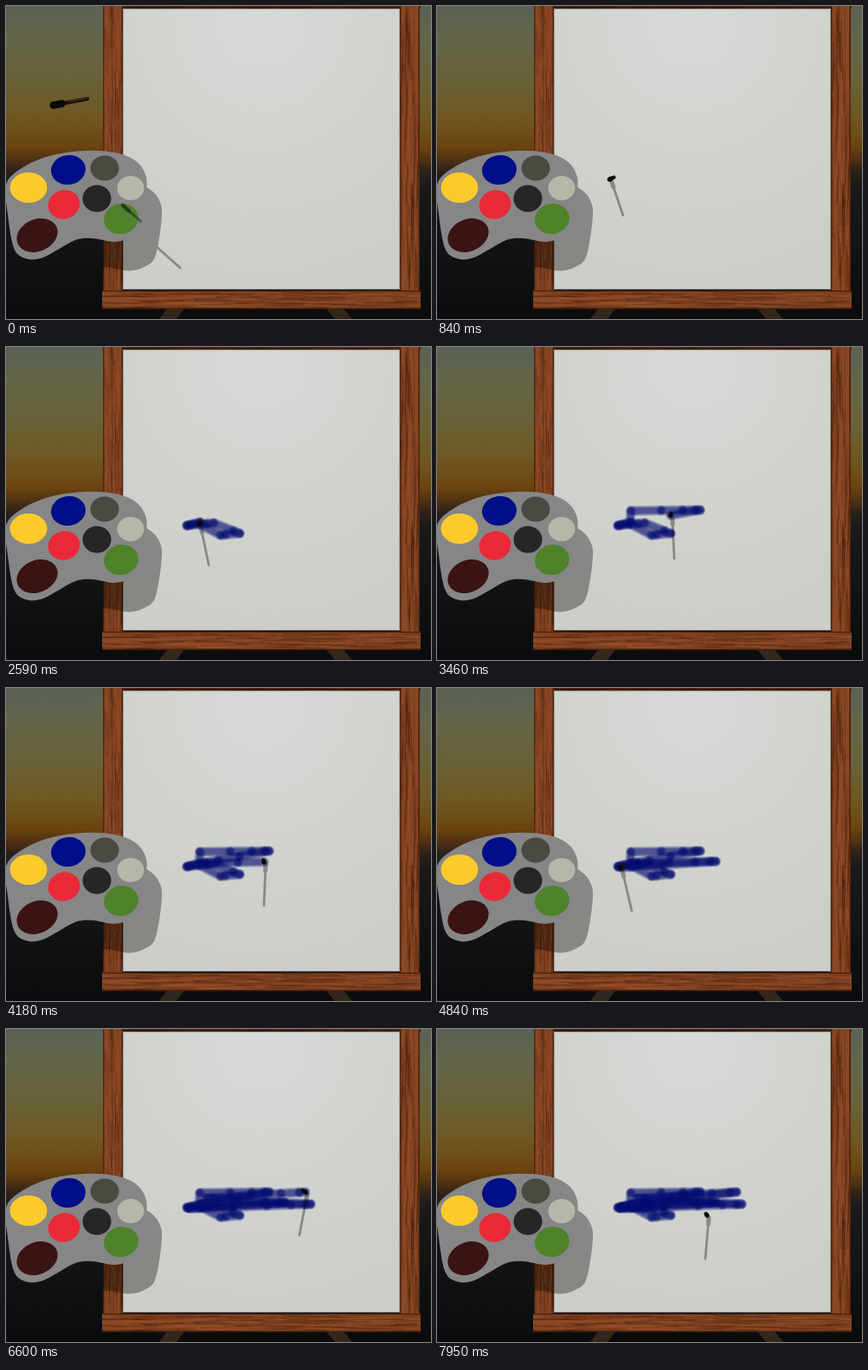
Write an HTML page with a canvas that moves like this. It is 491 px wide and 361 px high and loops after 8000 ms.

```html
<!DOCTYPE html>
<html lang="en">
<head>
<meta charset="utf-8">
<title>Painting easel</title>
<style>
html, body { margin: 0; width: 100%; height: 100%; overflow: hidden; background: #0c0d0e; }
canvas { display: block; }
</style>
</head>
<body>
<canvas id="stage" width="491" height="361"></canvas>
<script>
const W = 491, H = 361, LOOP = 8000, STEPS = 58;
const ctx = document.getElementById('stage').getContext('2d');

function layer() {
  const c = document.createElement('canvas');
  c.width = W;
  c.height = H;
  return c.getContext('2d');
}

function seeded(seed) {
  return () => (seed = (seed * 16807) % 2147483647) / 2147483647;
}

// Closed smooth curve through points
function smoothPath(pts) {
  const p = new Path2D(), n = pts.length;
  const at = i => pts[(i + n) % n];
  p.moveTo(...pts[0]);
  for (let i = 0; i < n; i++) {
    const [a, b, c, d] = [at(i - 1), at(i), at(i + 1), at(i + 2)];
    p.bezierCurveTo(b[0] + (c[0] - a[0]) / 6, b[1] + (c[1] - a[1]) / 6,
      c[0] - (d[0] - b[0]) / 6, c[1] - (d[1] - b[1]) / 6, c[0], c[1]);
  }
  p.closePath();
  return p;
}

function line(g, x1, y1, x2, y2, width, color) {
  g.strokeStyle = color;
  g.lineWidth = width;
  g.lineCap = 'round';
  g.beginPath();
  g.moveTo(x1, y1);
  g.lineTo(x2 + 0.01, y2);
  g.stroke();
}

// ---- scenery ----
function wood(g, x, y, w, h, seed) {
  const rnd = seeded(seed), upright = h > w;
  const long = upright ? h : w, thick = upright ? w : h;
  g.save();
  g.beginPath();
  g.rect(x, y, w, h);
  g.clip();
  g.fillStyle = '#874624';
  g.fillRect(x, y, w, h);
  const tones = ['rgba(58,24,8,.4)', 'rgba(165,88,44,.35)', 'rgba(90,40,16,.4)'];
  for (let i = 0; i < long * 0.5; i++) {
    const a = rnd() * long - 20, b = rnd() * thick, len = 15 + rnd() * 55;
    const bend = rnd() * 2 - 1, tone = tones[i % 3], lw = 0.5 + rnd() * 0.9;
    if (upright) line(g, x + b, y + a, x + b + bend, y + a + len, lw, tone);
    else line(g, x + a, y + b, x + a + len, y + b + bend, lw, tone);
  }
  g.strokeStyle = 'rgba(35,14,5,.55)';
  g.lineWidth = 3;
  if (upright) g.strokeRect(x, y - 9, w, h + 18);
  else g.strokeRect(x - 9, y, w + 18, h);
  g.restore();
}

function leg(g, x, lean) {
  g.fillStyle = '#33261b';
  g.beginPath();
  g.moveTo(x, 349);
  g.lineTo(x + 20, 349);
  g.lineTo(x + 20 + lean, H);
  g.lineTo(x + lean, H);
  g.fill();
}

function makeScene() {
  const g = layer();
  const sky = g.createLinearGradient(0, 0, 0, H);
  [[0, '#5b6256'], [.1, '#636549'], [.24, '#686238'], [.34, '#6e5924'], [.4, '#6e4f1b'],
   [.45, '#6b430e'], [.495, '#4c2f13'], [.53, '#2b2119'], [.58, '#18191a'], [1, '#0a0b0c']]
    .forEach(s => sky.addColorStop(...s));
  g.fillStyle = sky;
  g.fillRect(0, 0, W, H);
  leg(g, 186, -9);
  leg(g, 370, 10);
  wood(g, 112, 0, 367, 3, 5);
  wood(g, 112, 0, 23, 330, 11);
  wood(g, 455, 0, 23, 330, 23);
  wood(g, 111, 328, 368, 21.5, 37);
  const cloth = g.createRadialGradient(295, 20, 20, 295, 20, 300);
  cloth.addColorStop(0, '#d6d9d6');
  cloth.addColorStop(.45, '#d1d3cf');
  cloth.addColorStop(1, '#cdcec9');
  g.fillStyle = cloth;
  g.fillRect(135, 3, 320, 324);
  g.strokeStyle = 'rgba(70,70,68,.35)';
  g.lineWidth = 1;
  g.strokeRect(135.5, 3.5, 319, 323);
  return g.canvas;
}

// ---- palette ----
const palette = smoothPath([[0, 206], [18, 187], [50, 173], [90, 167], [125, 169], [149, 178],
  [161, 194], [162, 215], [155, 255], [143, 267], [125, 272], [100, 268],
  [80, 270], [60, 281], [40, 291], [22, 291], [9, 279], [2, 240]]);

const wells = [
  [26, 209.5, 21.5, 17.5, 0, '#fdca2c'], [72, 189, 20, 17, -.15, '#000e89'],
  [114, 187, 16.5, 14.5, 0, '#4a4a43'], [144, 210, 15.5, 14, 0, '#b6b7a8'],
  [67, 229, 18.5, 16.5, -.3, '#ea2938'], [105, 222, 16.5, 15.5, 0, '#262626'],
  [133, 245.5, 20, 17.5, -.2, '#4f822a'], [36, 264.5, 24.5, 18.5, -.4, '#3b1313']
];

function makePalette() {
  const g = layer();
  g.fillStyle = '#868686';
  g.fill(palette);
  for (const [x, y, rx, ry, tilt, color] of wells) {
    g.fillStyle = color;
    g.beginPath();
    g.ellipse(x, y, rx, ry, tilt, 0, 7);
    g.fill();
  }
  return g.canvas;
}

// ---- motion ----
// Turning points of the brush: step, x, y
const turns = [[0, 57, 114], [3, 72, 188], [8, 224, 202], [12, 209, 206], [14, 240, 203],
  [16, 270, 215], [18, 248, 217], [19, 223, 204], [20, 224, 189], [24, 304, 188], [28, 226, 202],
  [32, 322, 200], [35, 212, 207], [40, 352, 202], [44, 232, 195], [48, 346, 188],
  [52, 214, 205], [57, 312, 215]];
const PEN_DOWN = 8, PEN_UP = 53;

// Each sweep starts fast and settles at its end
function tipAt(step) {
  const k = Math.max(1, turns.findIndex(p => p[0] >= step));
  const [s0, x0, y0] = turns[k - 1], [s1, x1, y1] = turns[k];
  const f = 1 - (1 - (step - s0) / (s1 - s0)) ** 2;
  return [x0 + (x1 - x0) * f, y0 + (y1 - y0) * f];
}

function drawPaint(step) {
  for (let i = PEN_DOWN; i <= Math.min(step, PEN_UP); i++) {
    const a = tipAt(Math.max(i - 1, PEN_DOWN)), b = tipAt(i);
    line(ctx, ...a, ...b, 12, 'rgba(12,24,118,.16)');
    line(ctx, ...a, ...b, 10, 'rgba(8,18,114,.32)');
    line(ctx, ...a, ...b, 7, 'rgba(0,8,108,.36)');
  }
}

function drawBrush(x, y, bx, by) {
  const size = Math.min(1, Math.hypot(bx, by) / 38);
  line(ctx, x, y, x + bx, y + by, 4.5, '#1c130f');
  if (size > .3) line(ctx, x + bx * .45, y + by * .45 - 1, x + bx, y + by - 1, 1.5, '#4a2e1c');
  line(ctx, x - bx * .06, y - by * .06, x + bx * .2, y + by * .2, 5 + 3.5 * size, '#0b0a0b');
}

function drawShadow(g, x, y, sx, sy, color) {
  line(g, x, y, x + sx, y + sy, 2.8, color);
  line(g, x, y, x + sx * .15, y + sy * .15, 5, color);
}

const scene = makeScene(), paletteArt = makePalette(), shade = layer();

function draw(time) {
  const step = Math.floor(time / LOOP * STEPS + .25);
  const [x, y] = tipAt(step);
  const lift = Math.max(0, 1 - step / 7) ** 3;
  // The light sits above the middle, so shadows fan outwards
  const sx = (285 - x) * .15 + lift * 14, sy = Math.min(47, 35 + step / 2) + lift * 8;
  const shX = x + 2 + lift * 94, shY = y + 3 + lift * 142;

  ctx.drawImage(scene, 0, 0);
  drawPaint(step);

  // Shadows merge on one layer before darkening the board
  shade.clearRect(0, 0, W, H);
  shade.save();
  shade.translate(17.5, 33.5);
  shade.fill(palette);
  shade.restore();
  drawShadow(shade, shX, shY, sx, sy, '#000');
  ctx.globalAlpha = .34;
  ctx.drawImage(shade.canvas, 112, 0, 367, 350, 112, 0, 367, 350);
  ctx.globalAlpha = 1;

  ctx.drawImage(paletteArt, 0, 0);
  if (lift > 0) {
    ctx.save();
    ctx.clip(palette);
    drawShadow(ctx, shX - 18, shY - 29, sx, sy, 'rgba(25,30,15,.5)');
    ctx.restore();
  }
  drawBrush(x, y, sx * .35 + lift * 20, -2 - lift * 5);
}

function tick() {
  draw(performance.now() % LOOP);
  requestAnimationFrame(tick);
}
tick();
</script>
</body>
</html>
```
